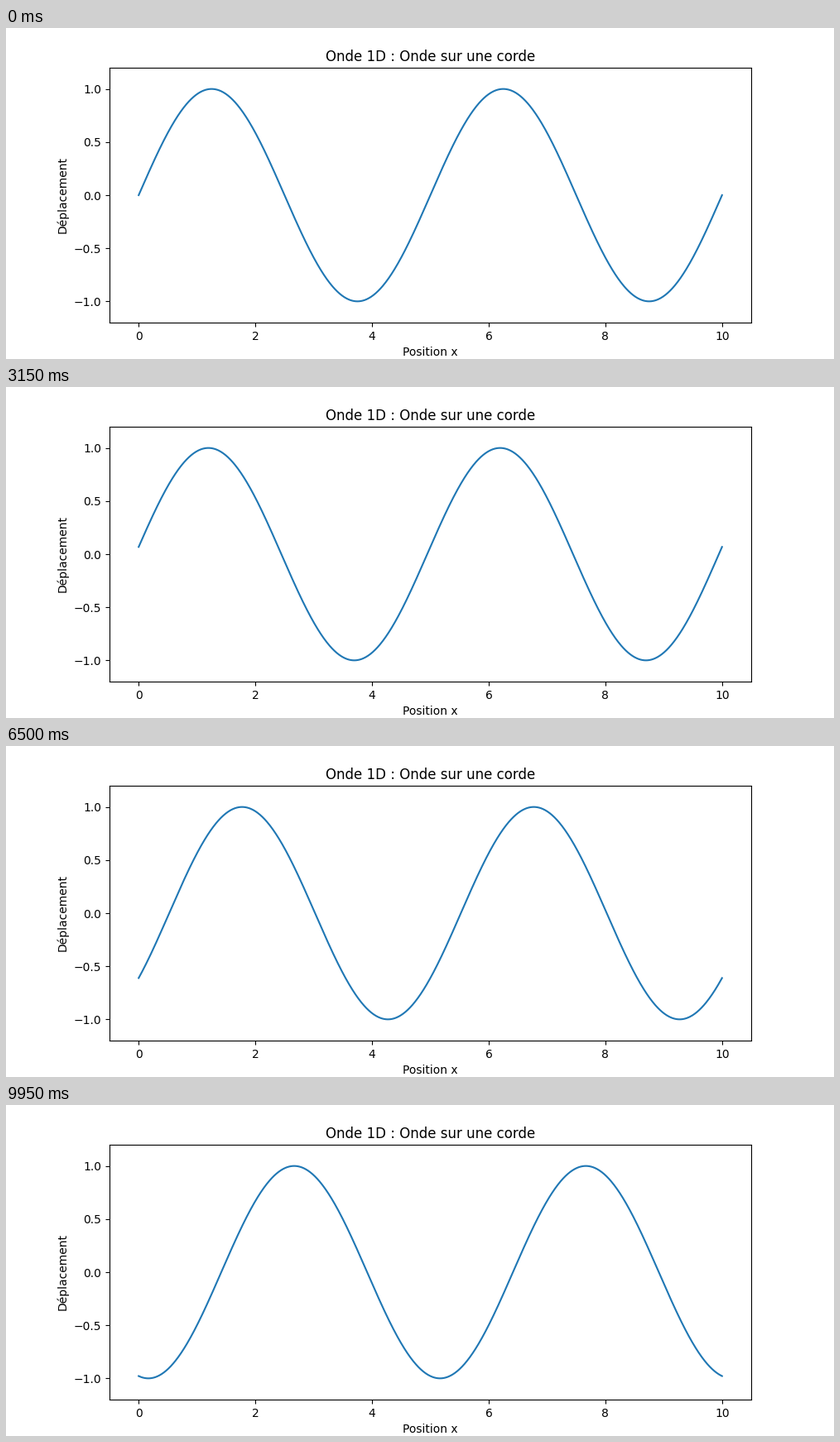
Animation, 1000 px wide and 400 px high, one loop 10 s. Source, as a matplotlib script:

```python
import numpy as np
import matplotlib.pyplot as plt
from matplotlib.animation import FuncAnimation

FRAMES = 200
INTERVAL = 50  # ms
WAVELENGTH = 5
OMEGA = 2 * np.pi

x = np.linspace(0, 10, 1000)
times = np.linspace(0, 2 * np.pi, FRAMES)


def wave(t):
    return np.sin(2 * np.pi / WAVELENGTH * x - OMEGA * t)


fig, ax = plt.subplots(figsize=(10, 4), dpi=100)
line, = ax.plot(x, wave(0))
ax.set_xlim(-0.5, 10.5)
ax.set_ylim(-1.2, 1.2)
ax.set_title("Onde 1D : Onde sur une corde")
ax.set_xlabel("Position x")
ax.set_ylabel("Déplacement")


def update(frame):
    line.set_ydata(wave(times[frame]))
    return line,


anim = FuncAnimation(fig, update, frames=FRAMES, interval=INTERVAL,
                     repeat=True, repeat_delay=0, blit=False)
plt.show()
```
